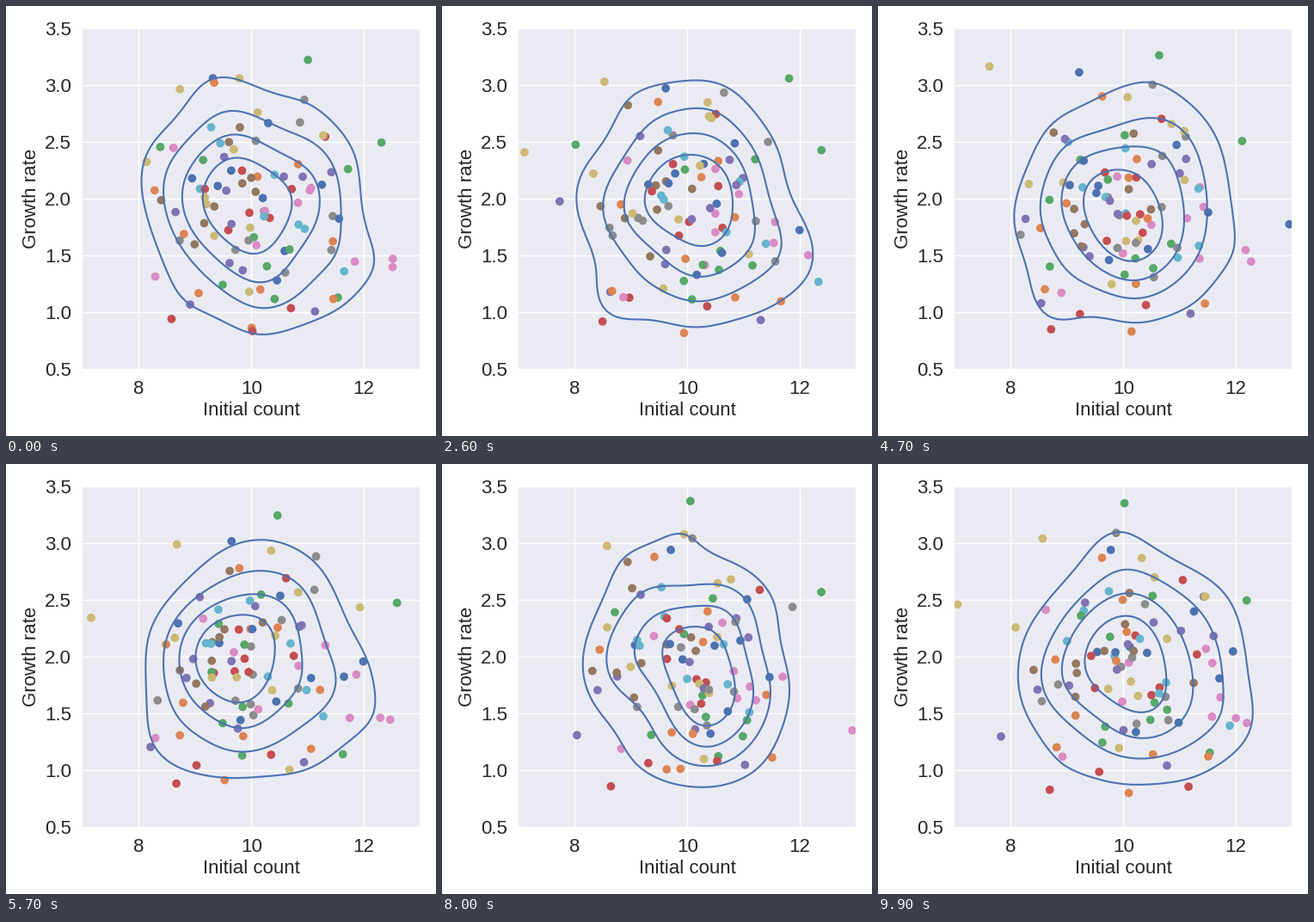
A matplotlib script that plays this animation: 500 px wide and 500 px high, repeating every 10000 ms.

```python
import numpy as np
import matplotlib.pyplot as plt
from matplotlib.animation import FuncAnimation

FRAMES, INTERVAL = 100, 100
N = 100
BANDWIDTH = 0.52
INK, LINE = "#262626", "#4C72B0"
PALETTE = ["#4C72B0", "#DD8452", "#55A868", "#C44E52", "#8172B3",
           "#937860", "#DA8BC3", "#8C8C8C", "#CCB974", "#64B5CD"]

plt.rcParams.update({
    "font.family": ["Liberation Sans", "DejaVu Sans"], "font.size": 16,
    "text.color": INK, "axes.labelcolor": INK, "axes.labelpad": 3.2,
    "xtick.color": INK, "ytick.color": INK,
    "xtick.major.size": 6, "ytick.major.size": 6,
    "axes.facecolor": "#EAEAF2", "axes.axisbelow": True,
})

# Outlying series: palette index, initial count, growth rate
OUTLIERS = np.array([
    (0, 9.6, 2.98), (1, 9.9, 0.88), (2, 10.6, 3.26), (2, 12.2, 2.54),
    (3, 8.8, 0.84), (4, 8.3, 1.18), (4, 10.8, 1.06), (6, 12.3, 1.47),
    (7, 10.65, 2.95), (8, 8.4, 3.05), (8, 7.95, 2.18),
])


def bell_spiral(n, center, scale):
    """Evenly spread points with a trimmed normal radius."""
    k = np.arange(n)
    r = np.sqrt(-2 * np.log(1 - (k + 0.5) / (n + 8)))
    angle = k * np.pi * (3 - np.sqrt(5))
    return center + np.column_stack([np.cos(angle), np.sin(angle)]) \
        * r[:, None] * scale


rng = np.random.default_rng(5)
body = bell_spiral(N - len(OUTLIERS), (10.1, 1.92), (0.9, 0.49))
body += rng.normal(0, (0.12, 0.05), body.shape)
rng.shuffle(body)
BASE = np.vstack([OUTLIERS[:, 1:], body])
COLORS = [PALETTE[int(c)] for c in OUTLIERS[:, 0]]
COLORS += [PALETTE[k % 10] for k in range(len(body))]
SIGMA = rng.uniform(0.2, 0.6, N)


def draw_sample(i):
    """One independent draw; count and rate errors are anticorrelated."""
    rng = np.random.default_rng(100 + i)
    dx = SIGMA * rng.standard_normal(N)
    dy = -0.2 * dx + rng.normal(0, 0.04, N)
    return BASE + np.column_stack([dx, dy])


GX, GY = np.meshgrid(np.linspace(6, 14, 100), np.linspace(0, 4, 100))
GRID = np.column_stack([GX.ravel(), GY.ravel()])


def density(pts):
    """Gaussian kernel density shaped by the sample covariance."""
    cov = np.cov(pts.T) * BANDWIDTH ** 2
    white = np.linalg.inv(np.linalg.cholesky(cov)).T
    a, b = GRID @ white, pts @ white
    d2 = (a[:, :1] - b[:, 0]) ** 2 + (a[:, 1:] - b[:, 1]) ** 2
    return np.exp(-d2 / 2).sum(axis=1).reshape(GX.shape)


def mass_levels(z, shares=(0.2, 0.4, 0.6, 0.8)):
    """Heights that leave the given shares of mass outside."""
    v = np.sort(z.ravel())
    mass = np.cumsum(v) / v.sum()
    return v[np.searchsorted(mass, shares)]


fig, ax = plt.subplots(figsize=(5, 5), dpi=100)
fig.subplots_adjust(left=0.178, right=0.963, bottom=0.157, top=0.948)
ax.set(xlim=(7, 13), ylim=(0.5, 3.5), xticks=[8, 10, 12],
       yticks=np.arange(0.5, 3.6, 0.5),
       xlabel="Initial count", ylabel="Growth rate")
ax.grid(color="white", linewidth=1)
ax.tick_params(left=False, bottom=False)
ax.spines[:].set_visible(False)

dots = ax.scatter(*BASE.T, s=36, c=COLORS, linewidths=1, edgecolors="face")
rings = None


def update(i):
    global rings
    pts = draw_sample(i)
    dots.set_offsets(pts)
    if rings is not None:
        rings.remove()
    z = density(pts)
    rings = ax.contour(GX, GY, z, levels=mass_levels(z),
                       colors=LINE, linewidths=1.5)
    return dots, rings


anim = FuncAnimation(fig, update, frames=FRAMES, interval=INTERVAL,
                     repeat=True, repeat_delay=0)
plt.show()
```
